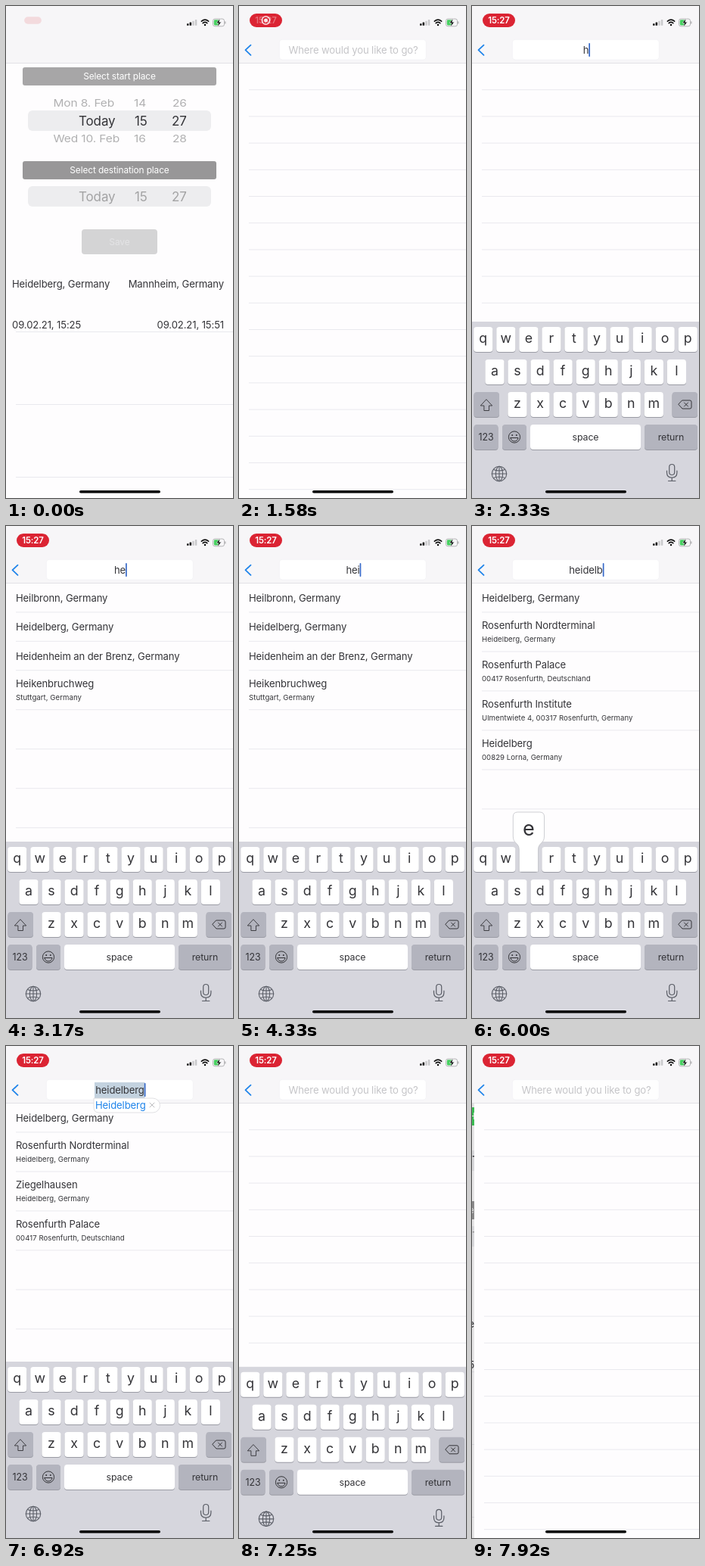
An HTML page for the animation above (8 s loop, 300 by 650 pixels).

```html
<!DOCTYPE html>
<html lang="en">
<head>
<meta charset="utf-8">
<title>Trip search</title>
<style>
  html, body { margin: 0; width: 100%; height: 100%; overflow: hidden; background: #fff; }
  svg { display: block; width: 100%; height: 100%; }
  text { font-family: Inter, Roboto, "Liberation Sans", sans-serif; white-space: pre; }
</style>
</head>
<body>
<svg id="stage" viewBox="0 0 300 650"></svg>
<script>
const LOOP = 8000, FPS = 12;
const $ = id => document.getElementById(id);

// ---- drawing helpers ----
const ink = '#343438', paper = '#fefdfe', grey = '#b3b4be', soft = '#5a5d66', blue = '#1f84ea', red = '#db2433';
const rect = (x, y, w, h, fill, r = 0, extra = '') =>
  `<rect x="${x}" y="${y}" width="${w}" height="${h}" rx="${r}" fill="${fill}" ${extra}/>`;
const line = (y, x = 13) => rect(x, y - .5, 300 - x, 1, '#e9e9ee');
const path = (d, color, width = 1, extra = '') =>
  `<path d="${d}" fill="none" stroke="${color}" stroke-width="${width}" stroke-linecap="round" stroke-linejoin="round" ${extra}/>`;
// y is the middle of the capitals
const text = (s, x, y, size, fill, anchor = 'start', extra = '') =>
  `<text x="${x}" y="${(y + size * .36).toFixed(2)}" font-size="${size}" fill="${fill}" text-anchor="${anchor}" letter-spacing="${size > 10 ? -.12 : .05}" ${extra}>${s}</text>`;
const group = (id, body) => `<g id="${id}">${body}</g>`;

// ---- start page ----
function wheel(y, color) {
  return rect(29, y - 13.5, 242, 27, '#ededef', 6) +
    text('Today', 96, y, 17, color) + text('15', 170, y, 17, color) + text('27', 219, y, 17, color);
}
function wheelSide(y, day, hour, minute) {
  return `<g transform="translate(0 ${y}) scale(1 .88)">` +
    [[day, 62.5], [hour, 169], [minute, 220]].map(([s, x]) => text(s, x, 0, 15.5, '#b0b0b1')).join('') + '</g>';
}
const homePage = rect(0, 0, 300, 650, paper) +
  rect(22, 81, 256, 24, '#a7a6a7', 3, 'id="startBtn"') +
  text('Select start place', 150, 93, 11.9, '#fff', 'middle', 'id="startLabel"') +
  wheelSide(128, 'Mon 8. Feb', '14', '26') + wheel(151.5, ink) + wheelSide(175, 'Wed 10. Feb', '16', '28') +
  rect(22, 205, 256, 24, '#989798', 3) + text('Select destination place', 150, 217, 11.9, '#fff', 'middle') +
  wheel(251.5, '#a3a3a4') +
  rect(100, 295, 100, 33, '#d4d4d5', 4) + text('Save', 150, 312, 12, '#e3e3e5', 'middle') +
  text('Heidelberg, Germany', 8, 367, 13.1, ink) + text('Mannheim, Germany', 288, 367, 13.1, ink, 'end') +
  text('09.02.21, 15:25', 8, 421.5, 13.1, ink) + text('09.02.21, 15:51', 288, 421.5, 13.1, ink, 'end') +
  line(430.5) + line(526.5) + line(622.5);

// ---- result lists: [title, subtitle] ----
const city = 'Heidelberg, Germany';
const terminal = ['Rosenfurth Nordterminal', city];
const palace = ['Rosenfurth Palace', '00417 Rosenfurth, Deutschland'];
const lists = [
  [0, []],
  [3150, [['Heilbronn, Germany'], [city], ['Heidenheim an der Brenz, Germany'],
          ['Heikenbruchweg', 'Stuttgart, Germany']]],
  [5070, [[city], terminal, palace,
          ['Rosenfurth Institute', 'Ulmentwiete 4, 00317 Rosenfurth, Germany'],
          ['Heidelberg', '00829 Lorna, Germany']]],
  [6400, [[city], terminal, ['Ziegelhausen', city], palace]],
  [7200, []]
];
function drawList(rows) {
  let y = 75.5, out = '', h = 35.2;
  for (const [title, sub] of rows) {
    h = sub ? 52 : 38.4;
    out += text(title, 13, y + (sub ? 17.5 : 19.5), 13.1, ink);
    if (sub) out += text(sub, 13, y + 35.5, 9.6, ink);
    y += h;
    out += line(y);
  }
  for (y += h; y < 650; y += h) out += line(y);
  return out;
}

// ---- keyboard ----
const keyRows = [['qwertyuiop', 14.8, 424], ['asdfghjkl', 30, 467], ['zxcvbnm', 60, 510]];
const keyPos = {};
const keyBox = (x, y, w, fill = '#fff') => rect(x, y + 1, w, 33, '#9a9ba4', 4) + rect(x, y, w, 33, fill, 4);
const letter = (c, x, y, size) =>
  `<text x="${x}" y="${y}" font-size="${size}" fill="${ink}" text-anchor="middle">${c}</text>`;
function drawKeyboard() {
  let out = rect(0, 417, 300, 233, '#d6d6dd');
  for (const [letters, x0, y] of keyRows)
    [...letters].forEach((c, i) => {
      const x = x0 + i * 30.05;
      keyPos[c] = [x, y];
      out += keyBox(x - 12.6, y, 25.2) + letter(c, x, y + 21, 17.8);
    });
  out += keyBox(2.5, 510, 33.5, grey) + keyBox(264.5, 510, 33.5, grey) +
    keyBox(2.5, 553, 32, grey) + keyBox(40, 553, 32, grey) + keyBox(77, 553, 146) + keyBox(228, 553, 70, grey);
  out += text('123', 18.5, 570, 12.4, ink, 'middle') + text('space', 150, 569.5, 12.4, ink, 'middle') +
    text('return', 263, 569.5, 12.4, ink, 'middle');
  out += path('M19.2 520l7.5 8h-4.2v6.5h-6.6v-6.5h-4.2z', ink, .9);
  out += path('M278 521h10q2 0 2 2v7q0 2-2 2h-10l-5-5.5zM280.5 524l5 5M285.5 524l-5 5', ink, 1);
  out += `<circle cx="56" cy="569.5" r="7.6" fill="none" stroke="${ink}"/>` +
    `<circle cx="53.2" cy="567" r="1" fill="${ink}"/><circle cx="58.8" cy="567" r="1" fill="${ink}"/>` +
    path('M51 570.5h10q-.8 4.5-5 4.5t-5-4.5z', ink, 1);
  out += `<g fill="none" stroke="${soft}" stroke-width="1.1"><circle cx="36" cy="618" r="9.7"/><ellipse cx="36" cy="618" rx="4.6" ry="9.7"/></g>` +
    path('M36 608.3v19.4M26.3 618h19.4M28.5 612.5q7.5 3 15 0M28.5 623.5q7.5-3 15 0', soft, 1.1);
  out += rect(260.7, 605.5, 7, 14, 'none', 3.5, `stroke="${soft}" stroke-width="1.2"`) +
    path('M257.5 614v2.5q0 6.5 6.7 6.5t6.7-6.5v-2.5M264.2 623v4.5M259.5 627.5h9.4', soft, 1.2);
  return out;
}
function bubble(c) {
  const [x, y] = keyPos[c];
  const d = `M${x - 12.6} ${y + 33}v-29c0-10-8-8-8-18v-26q0-6 6-6h29.2q6 0 6 6v26c0 10-8 8-8 18v29z`;
  return `<path d="${d}" fill="#fff" stroke="#b9bbc1" stroke-width=".7"/>` + letter(c, x, y - 15, 27);
}

// ---- bars ----
const navBar = rect(0, 0, 300, 75, '#f7f6f8') + rect(0, 75, 300, .8, '#dddce0') +
  group('search',
    path('M15.5 51.6l-7 6.6 7 6.6', blue, 1.8) +
    rect(53.3, 44.3, 194, 26.8, '#fff', 4, 'stroke="#efeff1" stroke-width=".6"') +
    rect(117, 48, 66.5, 21, '#c3d2df', 0, 'id="mark"') +
    text('Where would you like to go?', 151, 58, 13.1, '#c5c5c8', 'middle', 'id="hint"') +
    text('', 150.5, 58, 13.1, ink, 'middle', 'id="query"') +
    rect(0, 49, 1.7, 18, '#3568c8', .8, 'id="caret"'));
const fix = '<path d="M116 69H194a9.500 9.500 0 0 1 0 19H123Q116 88 116 81z" fill="#fff" stroke="#d8d8dc" stroke-width=".8"/>' +
  text('Heidelberg', 118, 78.2, 13.1, blue) + path('M190 75l6 6M196 75l-6 6', '#b4b4b8', .9);
const status =
  [0, 1, 2, 3].map(i => rect(239 + i * 3.6, 23.2 - i * 1.7, 2.5, 2.6 + i * 1.7, i < 2 ? '#111' : '#c9c9cb', .6)).join('') +
  path('M258.400 20.200q4.600-4 9.200 0M260.200 22.600q2.800-2.400 5.600 0', '#111', 1.7) + '<circle cx="263" cy="25" r="1.200"/>' +
  rect(273.5, 17, 15, 9.8, 'none', 2.6, 'stroke="#a5a5a7" stroke-width=".8"') + rect(289.3, 20.2, 1.1, 3.4, '#a5a5a7', .5) +
  rect(274.8, 18.3, 7, 7.2, '#45d05f', 1.4) +
  '<path d="M283 16.200l-5 6.300h2.800l-1.600 5.300 5.400-6.600h-2.900z" stroke="#f7f7f8" stroke-width=".6"/>';
const pill = rect(14, 10, 43, 18, red, 9) +
  group('rec', '<circle cx="35.500" cy="19" r="5.200" fill="none" stroke="#fff" stroke-width="1.500"/><circle cx="35.500" cy="19" r="2.500" fill="#fff"/>') +
  text('15:27', 35.5, 19, 11.4, '#fff', 'middle', 'id="clock" font-weight="600"');

$('stage').innerHTML =
  group('home', homePage) + rect(0, 0, 300, 650, '#000', 0, 'id="dim"') +
  group('finder', rect(0, 0, 300, 650, paper) + group('list', '')) +
  navBar + group('fix', fix) + group('pill', pill) + status +
  group('keys', drawKeyboard()) + group('bubble', '') +
  rect(97, 640, 107, 3.6, '#000', 1.8);

// ---- timeline ----
const presses = [['h', 2150], ['e', 2980], ['i', 3730], ['d', 4480], ['e', 4810], ['l', 5150],
                 ['b', 5560], ['e', 5980], ['r', 6230], ['g', 6560]];
const DONE = 7200;

const ramp = (t, start, len) => Math.min(1, Math.max(0, (t - start) / len));
const easeOut = p => 1 - (1 - p) ** 3;
const easeInOut = p => p < .5 ? 4 * p ** 3 : 1 - 4 * (1 - p) ** 3;
const set = (id, name, v) => $(id).setAttribute(name, v);
const show = (id, on) => set(id, 'visibility', on ? 'visible' : 'hidden');
let shownList = null;

function draw(t) {
  // page push and pop
  const p = easeInOut(ramp(t, 960, 520)) - easeInOut(ramp(t, 7849, 500));
  set('finder', 'transform', `translate(${300 * (1 - p)} 0)`);
  set('home', 'transform', `translate(${-97 * p} 0)`);
  set('dim', 'opacity', .1 * p);
  set('search', 'opacity', p);
  const picked = t > DONE;
  set('startBtn', 'fill', picked ? '#3fcf5a' : '#a7a6a7');
  $('startLabel').textContent = picked ? city : 'Select start place';

  // recording pill
  const grow = easeOut(ramp(t, 0, 420)), swap = ramp(t, 1500, 240), s = .53 + .47 * grow;
  set('pill', 'transform', `translate(35.5 19) scale(${s}) translate(-35.5 -19)`);
  set('pill', 'opacity', .13 + .87 * grow);
  set('rec', 'opacity', grow * (1 - swap ** 2));
  set('clock', 'opacity', swap);

  // typing
  const typed = picked ? '' : presses.filter(k => t >= k[1] + 90).map(k => k[0]).join('');
  $('query').textContent = typed;
  show('hint', !typed);
  show('caret', t > 1740 && !picked);
  set('caret', 'x', 150.5 + (typed ? $('query').getComputedTextLength() / 2 : 0));
  const suggest = t > 6740 && !picked;
  show('mark', suggest);
  show('fix', suggest);

  const up = easeOut(ramp(t, 1710, 300)) - easeInOut(ramp(t, DONE, 260));
  set('keys', 'transform', `translate(0 ${240 * (1 - up)})`);
  const down = presses.find(k => t >= k[1] && t < k[1] + 130);
  $('bubble').innerHTML = down ? bubble(down[0]) : '';

  const rows = lists.filter(l => t >= l[0]).pop()[1];
  if (rows !== shownList) $('list').innerHTML = drawList(shownList = rows);
}

function tick() {
  const ms = performance.now() % LOOP;
  draw(Math.floor((ms + 5) * FPS / 1000) % (LOOP * FPS / 1000) * 1000 / FPS);
  requestAnimationFrame(tick);
}
tick();
</script>
</body>
</html>
```
